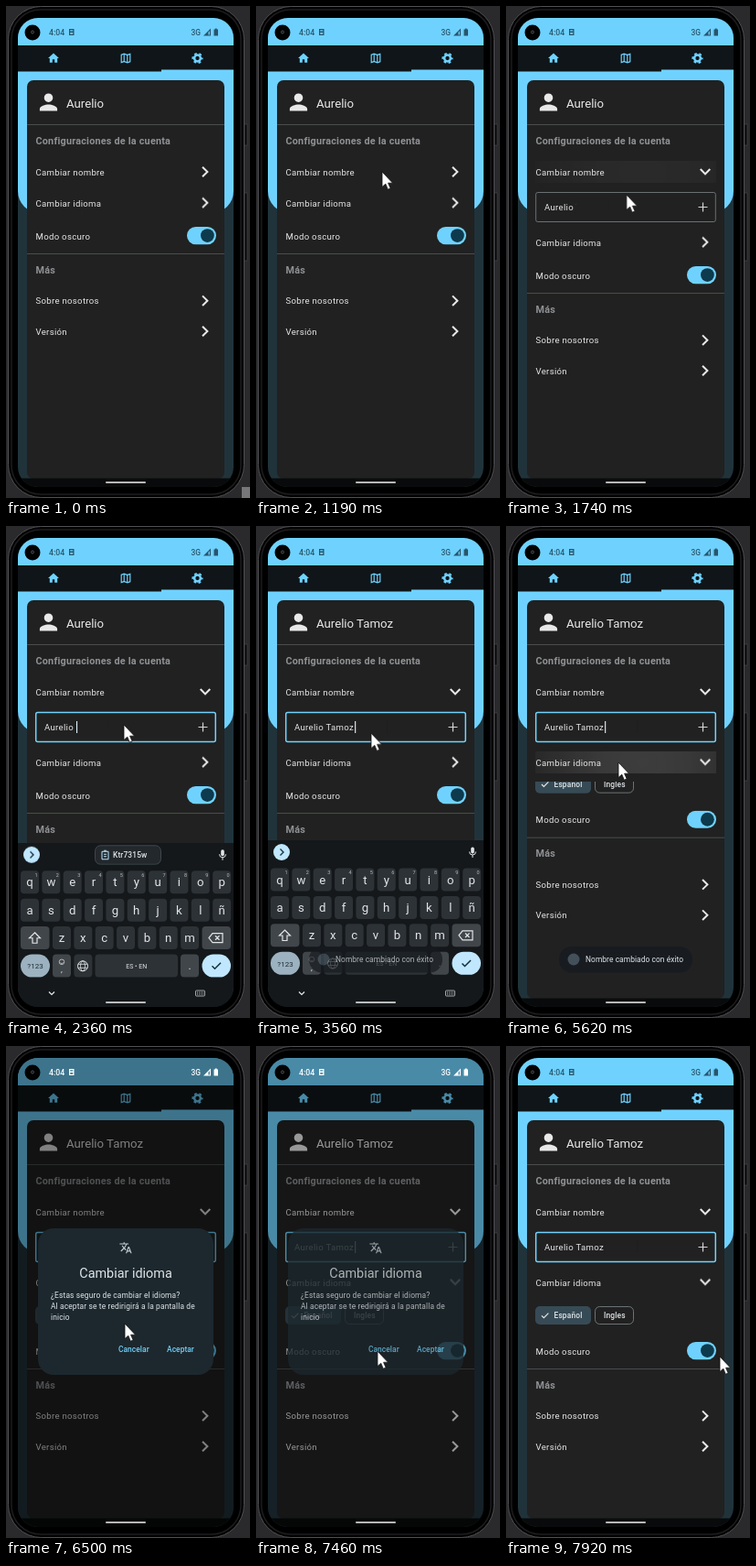
Recreate the animation shown at these times as an HTML page. Size 267 by 537 pixels, loop 7990 ms.

```html
<!DOCTYPE html>
<html lang="es">
<head>
<meta charset="utf-8">
<title>Ajustes</title>
<style>
html, body { margin: 0; width: 100%; height: 100%; overflow: hidden; background: #2a2a2d; }
svg { display: block; width: 267px; height: 537px; font-family: Roboto, sans-serif; }
.row { font-size: 9.6px; letter-spacing: .3px; fill: #e6e6e6; }
.head { font-size: 10.8px; letter-spacing: .22px; font-weight: 700; fill: #8f9194; }
.small { font-size: 8.4px; letter-spacing: .15px; fill: #dfe5e8; }
.med { font-weight: 500; }
.mid { text-anchor: middle; }
.line { fill: none; stroke: #e8e8e8; stroke-width: 2; }
.rule { fill: #4a4c4d; }

.a { animation: 7990ms linear infinite; }
.cursor { animation-name: cursor; }
.hover { animation-name: hover; animation-timing-function: step-end; }
.grow1 { animation-name: grow1; }
.grow2 { animation-name: grow2; }
.drop1 { animation-name: drop1; }
.drop2 { animation-name: drop2; }
.turn1 { animation-name: turn1; animation-timing-function: step-end; }
.turn2 { animation-name: turn2; animation-timing-function: step-end; }
.tap1 { animation-name: tap1; }
.tap2 { animation-name: tap2; }
.tap3 { animation-name: tap3; }
.focus { animation-name: focus; animation-timing-function: step-end; }
.type { animation-name: type; animation-timing-function: step-end; }
.blink { animation-name: blink; animation-timing-function: step-end; }
.surname { animation-name: surname; animation-timing-function: step-end; }
.paste { animation-name: paste; animation-timing-function: step-end; }
.keys { animation-name: keys; }
.nav { animation-name: nav; animation-timing-function: step-end; }
.toast { animation-name: toast; }
.scrim { animation-name: scrim; }
.dialog { animation-name: scrim, pop; transform-origin: 131px 279px; }
.status { animation-name: status; animation-timing-function: step-end; fill: currentColor; }

@keyframes cursor {
  0% { transform: translate(268px, 536px); animation-timing-function: ease-in-out; }
  10.5% { transform: translate(140px, 184px); }
  11.4%, 18.8% { transform: translate(138px, 181px); animation-timing-function: ease-in-out; }
  23.65%, 43.2% { transform: translate(129px, 217px); animation-timing-function: ease-in; }
  52.3% { transform: translate(46px, 467px); animation-timing-function: ease-out; }
  55.1%, 60.1% { transform: translate(39px, 506px); animation-timing-function: ease-in; }
  62.7% { transform: translate(45px, 459px); animation-timing-function: ease-out; }
  68.2%, 70.7% { transform: translate(123px, 258px); animation-timing-function: ease-in-out; }
  75.1%, 78.8% { transform: translate(128px, 297px); }
  81.35% { transform: translate(130px, 303px); animation-timing-function: ease-in-out; }
  87.5% { transform: translate(132px, 331px); }
  88.4%, 93% { transform: translate(132px, 333px); animation-timing-function: ease-in-out; }
  98.6%, 100% { transform: translate(234px, 339px); }
}
@keyframes hover { 0% { opacity: 1; } 1.7%, 100% { opacity: 0; } }
@keyframes grow1 {
  0%, 16.3% { transform: none; animation-timing-function: cubic-bezier(0, 0, .2, 1); }
  21.3%, 100% { transform: translateY(43px); }
}
@keyframes drop1 {
  0%, 16.3% { transform: translateY(-43px); animation-timing-function: cubic-bezier(0, 0, .2, 1); }
  21.3%, 100% { transform: none; }
}
@keyframes grow2 {
  0%, 68.77% { transform: none; animation-timing-function: cubic-bezier(0, 0, .2, 1); }
  73.53%, 100% { transform: translateY(39px); }
}
@keyframes drop2 {
  0%, 68.77% { transform: translateY(-39px); animation-timing-function: cubic-bezier(0, 0, .2, 1); }
  73.53%, 100% { transform: none; }
}
@keyframes turn1 { 0% { transform: none; } 16.3%, 100% { transform: rotate(90deg); } }
@keyframes turn2 { 0% { transform: none; } 68.77%, 100% { transform: rotate(90deg); } }
@keyframes tap1 { 0%, 15.3% { opacity: 0; } 16.8%, 18.6% { opacity: 1; } 23.4%, 100% { opacity: 0; } }
@keyframes tap2 { 0%, 67.9% { opacity: 0; } 69.4%, 70.6% { opacity: 1; } 74.5%, 100% { opacity: 0; } }
@keyframes tap3 { 0%, 56.6% { opacity: 0; } 57.6%, 59% { opacity: 1; } 62%, 100% { opacity: 0; } }
@keyframes focus {
  0% { stroke: #8a9297; stroke-width: .7px; }
  25.5%, 100% { stroke: #72d2fb; stroke-width: 1.5px; }
}
@keyframes type {
  0% { transform: none; }
  34.55% { transform: translateX(6px); }
  36.2% { transform: translateX(11.6px); }
  37.8% { transform: translateX(20.3px); }
  39.4% { transform: translateX(26.1px); }
  41.05%, 100% { transform: translateX(31.1px); }
}
@keyframes blink {
  0% { opacity: 0; }
  25.5% { opacity: 1; }
  47.3% { opacity: 0; }
  53.6% { opacity: 1; }
  59.8% { opacity: 0; }
  66.1% { opacity: 1; }
  72.3% { opacity: 0; }
  78.6% { opacity: 1; }
  84.9% { opacity: 0; }
  91.1% { opacity: 1; }
  97.4%, 100% { opacity: 0; }
}
@keyframes surname { 0% { visibility: hidden; } 42.8%, 100% { visibility: visible; } }
@keyframes paste { 0% { opacity: 1; } 42.8%, 100% { opacity: 0; } }
@keyframes keys {
  0%, 25.78% { transform: translateY(186px); animation-timing-function: cubic-bezier(0, 0, .2, 1); }
  30.29%, 59.2% { transform: none; animation-timing-function: cubic-bezier(.4, 0, 1, 1); }
  62.7%, 100% { transform: translateY(186px); }
}
@keyframes nav { 0% { opacity: 0; } 26.6% { opacity: 1; } 62%, 100% { opacity: 0; } }
@keyframes toast { 0%, 43.2% { opacity: 0; } 45.1%, 73.2% { opacity: 1; } 75.5%, 100% { opacity: 0; } }
@keyframes scrim { 0%, 77.8% { opacity: 0; } 79.85%, 93% { opacity: 1; } 94.6%, 100% { opacity: 0; } }
@keyframes pop { 0%, 77.8% { transform: scale(.88); } 79.85%, 100% { transform: none; } }
@keyframes status { 0% { color: #28566b; } 77.9% { color: #fff; } 93.6%, 100% { color: #28566b; } }
</style>
</head>
<body>
<svg viewBox="0 0 267 537">
  <defs>
    <clipPath id="screen"><rect x="13" y="13" width="236" height="512" rx="22"/></clipPath>
    <clipPath id="fieldClip"><rect x="23" y="198" width="216" height="60"/></clipPath>
    <clipPath id="chipClip"><rect x="23" y="236" width="216" height="40"/></clipPath>
    <radialGradient id="glow" gradientUnits="userSpaceOnUse" cx="150" cy="0" r="125" gradientTransform="translate(0 181)">
      <stop offset="0" stop-color="#fff" stop-opacity=".13"/>
      <stop offset=".4" stop-color="#fff" stop-opacity=".11"/>
      <stop offset="1" stop-color="#fff" stop-opacity=".03"/>
    </radialGradient>
    <path id="chev" class="line" d="M-3-5.3 2.4 0-3 5.3"/>
  </defs>

  <!-- phone body -->
  <rect width="267" height="537" fill="#2a2a2d"/>
  <path d="M261 129h3v23h-3zM261 204h3v74h-3z" fill="#0c0c0d" stroke="#4b4b4e" stroke-width=".6"/>
  <rect x="2.5" y=".5" width="258" height="536" rx="36" fill="#000" stroke="#505053"/>
  <rect x="6" y="4" width="251" height="529" rx="32" fill="none" stroke="#1d1d1f" stroke-width="1.5"/>
  <rect class="a hover" x="258" y="525" width="9" height="12" fill="#77777a"/>

  <g clip-path="url(#screen)">
    <rect x="13" y="13" width="236" height="512" fill="#20333b"/>
    <rect x="13" y="-10" width="236" height="236" rx="24" fill="#6fd2fe"/>
    <rect x="13" y="43" width="236" height="28.5" fill="#0f1518"/>
    <rect x="170" y="69.5" width="79" height="2.5" fill="#6fd2fe"/>
    <g fill="#6fd2fe">
      <path transform="translate(44.8 49.8) scale(.6)" d="M10 20v-6h4v6h5v-8h3L12 3 2 12h3v8z"/>
      <path transform="translate(123.8 49.8) scale(.6)" fill-rule="evenodd" d="M3 5 9 3l6 2 6-2v16l-6 2-6-2-6 2zM10 5.5v11.7l4 1.4V6.9zM5 6.4v11.8l3-1.1V5.4zM16 6.8v11.8l3-1V5.7z"/>
      <g transform="translate(209.5 57)" fill="none" stroke="#6fd2fe">
        <circle r="3.4" stroke-width="2.5"/>
        <circle r="5.2" stroke-width="1.8" stroke-dasharray="2.72" stroke-dashoffset="1.36"/>
      </g>
    </g>

    <!-- card -->
    <rect x="23" y="81" width="216" height="435" rx="7" fill="#212121"/>
    <path transform="translate(32.1 90.6) scale(1.2)" fill="#e8e8e8" d="M12 4a4 4 0 1 1 0 8 4 4 0 0 1 0-8zM12 14c-2.67 0-8 1.34-8 4v2h16v-2c0-2.66-5.33-4-8-4z"/>
    <text x="66" y="110.5" font-size="13.2" fill="#e6e6e6">Aurelio <tspan class="a surname">Tamoz</tspan></text>
    <rect class="rule" x="23" y="129" width="216" height="1"/>
    <text class="head" x="32.5" y="151.3">Configuraciones de la cuenta</text>
    <rect class="a tap1" x="32" y="169" width="198" height="24" fill="url(#glow)"/>
    <text class="row" x="32.5" y="184.8">Cambiar nombre</text>
    <g transform="translate(218 181)"><g class="a turn1"><use href="#chev"/></g></g>

    <g clip-path="url(#fieldClip)"><g class="a drop1">
      <rect class="a focus" x="32.7" y="203.5" width="196.6" height="32" rx="2" fill="#212121"/>
      <text class="row" x="42" y="222.8">Aurelio Tamoz</text>
      <g class="a type">
        <rect x="76.6" y="211" width="36" height="16" fill="#212121"/>
        <rect class="a blink" x="77" y="213" width="1.1" height="13" fill="#dff3fc"/>
      </g>
      <path d="M210.5 219.5h10M215.5 214.5v10" stroke="#d4d4d4" stroke-width="1.2"/>
    </g></g>

    <g class="a grow1">
      <g transform="translate(0 34)"><rect class="a tap2" x="32" y="169" width="198" height="24" fill="url(#glow)"/></g>
      <text class="row" x="32.5" y="218.5">Cambiar idioma</text>
      <g transform="translate(218 214.7)"><g class="a turn2"><use href="#chev"/></g></g>
      <g clip-path="url(#chipClip)"><g class="a drop2">
        <rect x="32" y="241" width="61" height="20" rx="5" fill="#374b56"/>
        <path class="line" d="m39 251.3 2.4 2.4 5-5" style="stroke-width:1.2"/>
        <text class="small med" x="52.5" y="254">Español</text>
        <rect x="97.5" y="241.5" width="42" height="19" rx="5" fill="none" stroke="#7f898e" stroke-width=".8"/>
        <text class="small med" x="107" y="254">Ingles</text>
      </g></g>
      <g class="a grow2">
        <text class="row" x="32.5" y="254.8">Modo oscuro</text>
        <rect x="198" y="241" width="32" height="19.2" rx="9.6" fill="#6fd2fe"/>
        <circle cx="220.4" cy="250.6" r="7.4" fill="#0d3a4d"/>
        <rect class="rule" x="23" y="270" width="216" height="1"/>
        <text class="head" x="32.5" y="291.8">Más</text>
        <text class="row" x="32.5" y="325.2">Sobre nosotros</text>
        <use href="#chev" x="218" y="321.7"/>
        <text class="row" x="32.5" y="358.8">Versión</text>
        <use href="#chev" x="218" y="355"/>
      </g>
    </g>
    <rect x="13" y="515.5" width="236" height="10" fill="#080a0b"/>

    <!-- keyboard -->
    <g class="a keys">
      <rect x="13" y="343" width="236" height="190" fill="#14181b"/>
      <circle cx="28" cy="356" r="9" fill="#c0e7fd"/>
      <path d="m26.5 352.5 3.5 3.5-3.5 3.5" fill="none" stroke="#173544" stroke-width="1.4"/>
      <g class="a paste">
        <rect x="97.5" y="346" width="72" height="20.5" rx="6" fill="#22282c" stroke="#4a5359" stroke-width=".8"/>
        <path d="M105 352.5h7v8.500h-7zM107 351.500h3M107 355.500h3M107 358h3" fill="none" stroke="#c0e7fd"/>
        <text class="small med" x="117" y="359.2" font-weight="700">Ktr7315w</text>
      </g>
      <rect x="235.200" y="350.500" width="3.600" height="7" rx="1.800" fill="#e2e5e8"/>
      <path d="M233.500 355.500a3.500 3.500 0 0 0 7 0M237 359v3" fill="none" stroke="#e2e5e8"/>
      <g id="keys"></g>
      <g fill="none" stroke="#e2e5e8" stroke-width="1.200">
        <path d="m31.500 441 6 6h-3.500v5.500h-5V447h-3.500z"/>
        <path d="M226 441.800h11v10h-11l-4-5zM229 444.500l4.500 4.500m0-4.500-4.500 4.500"/>
        <circle cx="84" cy="477.500" r="5.500" stroke-width="1"/>
        <ellipse cx="84" cy="477.500" rx="2.500" ry="5.500" stroke-width=".8"/>
        <path d="M79 475.500h10M79 479.500h10" stroke-width=".8"/>
        <circle cx="61" cy="473" r="2.800" stroke-width=".7"/>
        <path d="M59.500 473.700a1.600 1.600 0 0 0 3 0" stroke-width=".6"/>
        <path d="m225.500 477.500 3 3 6.500-6.500" stroke="#12303e" stroke-width="1.500"/>
      </g>
    </g>
    <g class="a nav">
      <rect class="a tap3" x="30" y="497" width="40" height="27" rx="13" fill="#3b4043"/>
      <path class="line" d="m47 508.500 3 3 3-3" style="stroke-width:1.200"/>
      <rect x="207.500" y="507" width="10" height="6" rx="1" fill="none" stroke="#c8ccd0" stroke-width=".8"/>
      <path d="M209 509h7M209 511h7" stroke="#c8ccd0" stroke-dasharray="1" stroke-width="1"/>
    </g>

    <g class="a toast">
      <rect x="58" y="459" width="146" height="28.500" rx="14" fill="#181c21"/>
      <circle cx="74" cy="473" r="6.500" fill="#43505a"/>
      <text class="small" x="87" y="476.300" style="letter-spacing:.08px">Nombre cambiado con éxito</text>
    </g>

    <!-- dialog -->
    <rect class="a scrim" x="13" y="13" width="236" height="512" fill="#000" fill-opacity=".45"/>
    <g class="a dialog">
      <rect x="35" y="199" width="192" height="160" rx="17" fill="#1c282e"/>
      <path transform="translate(123.800 213) scale(.6)" fill="#c3cdd3" d="M12.870 15.070l-2.540-2.510c1.740-1.940 3-4.200 3.740-6.560H17V4h-7V2H8v2H1v2h11.170C11.500 7.900 10.400 9.750 9 11.350 8 10.300 7.300 9.200 6.700 8h-2c.73 1.630 1.730 3.170 3 4.560l-5.100 5L4 19l5-5 3.110 3.110zM18.500 10h-2L12 22h2l1.120-3h4.750L21 22h2zm-2.620 7l1.620-4.330L19.120 17z"/>
      <text class="mid" x="131" y="252.800" font-size="14.400" fill="#dfe5e8">Cambiar idioma</text>
      <g class="small">
        <text x="49" y="275.300">¿Estas seguro de cambiar el idioma?</text>
        <text x="49" y="287.300">Al aceptar se te redirigirá a la pantalla de</text>
        <text x="49" y="299.300">inicio</text>
      </g>
      <g class="small med" style="fill:#72d2fb;letter-spacing:.06px">
        <text x="123" y="333.800">Cancelar</text>
        <text x="176" y="333.800">Aceptar</text>
      </g>
    </g>

    <g class="a status med">
      <text x="47" y="32" font-size="8.700">4:04</text>
      <path fill-rule="evenodd" d="M69 25h5.500v7H69zM70.200 26.300v1.200h3v-1.200zM70.200 29v1.700h3V29z"/>
      <text x="202.500" y="32" font-size="8.400">3G</text>
      <path fill-rule="evenodd" d="M224 24.500v8h-8zM222.900 27.200v4.200h-1.400v-2.800z"/>
      <path d="M227.500 25.500h1.300v-1h1.900v1h1.300v7h-4.500z"/>
    </g>
    <rect x="109" y="519.300" width="44" height="1.500" rx=".7" fill="#f2f2f2"/>
  </g>
  <circle cx="29" cy="29" r="8.500" fill="#020203"/>
  <circle cx="29" cy="28.500" r="1.500" fill="none" stroke="#5b6266" stroke-width=".8"/>

  <path class="a cursor" fill="#fff" stroke="#111" stroke-width=".8" d="M0 0v16.500l3.800-3.300 2.500 6 2.900-1.200-2.600-5.800h5z"/>
</svg>
<script>
const key = (x, y, w, fill, rx = 4) =>
  `<rect x="${x}" y="${y}" width="${w}" height="25" rx="${rx}" fill="${fill}"/>`;
const label = (x, y, s, size, fill = '#e2e5e8') =>
  `<text class="mid" x="${x}" y="${y}" font-size="${size}" fill="${fill}">${s}</text>`;
const plain = '#2d3236', dark = '#41464a';

const row = (letters, x0, y, digits = '') => [...letters].map((c, i) => {
  const x = x0 + i * 23.35;
  return key(x, y, 20, plain) + label(x + 10, y + 17, c, 13.2) +
    (digits ? label(x + 17, y + 6.5, digits[i], 5.5, '#b5babe') : '');
}).join('');

document.getElementById('keys').innerHTML =
  row('qwertyuiop', 16, 373.5, '1234567890') +
  row('asdfghjklñ', 16, 404) +
  row('zxcvbnm', 51, 434.3) +
  key(16, 434.3, 31.5, dark) + key(214.5, 434.3, 31.5, dark) +
  key(16, 464.8, 32, '#9cb2c0', 12.5) + label(32, 480.6, '?123', 8, '#1b2b34') +
  key(51, 464.8, 20, dark) + label(61, 484.5, ',', 9) +
  key(74.4, 464.8, 20, plain) +
  key(97.5, 464.8, 90.5, plain) + label(142.7, 480, 'ES • EN', 7) +
  key(191, 464.8, 20, dark) + label(201, 481, '.', 12) +
  key(214.5, 464.8, 31.5, '#c0e7fd', 12.5);
</script>
</body>
</html>
```
